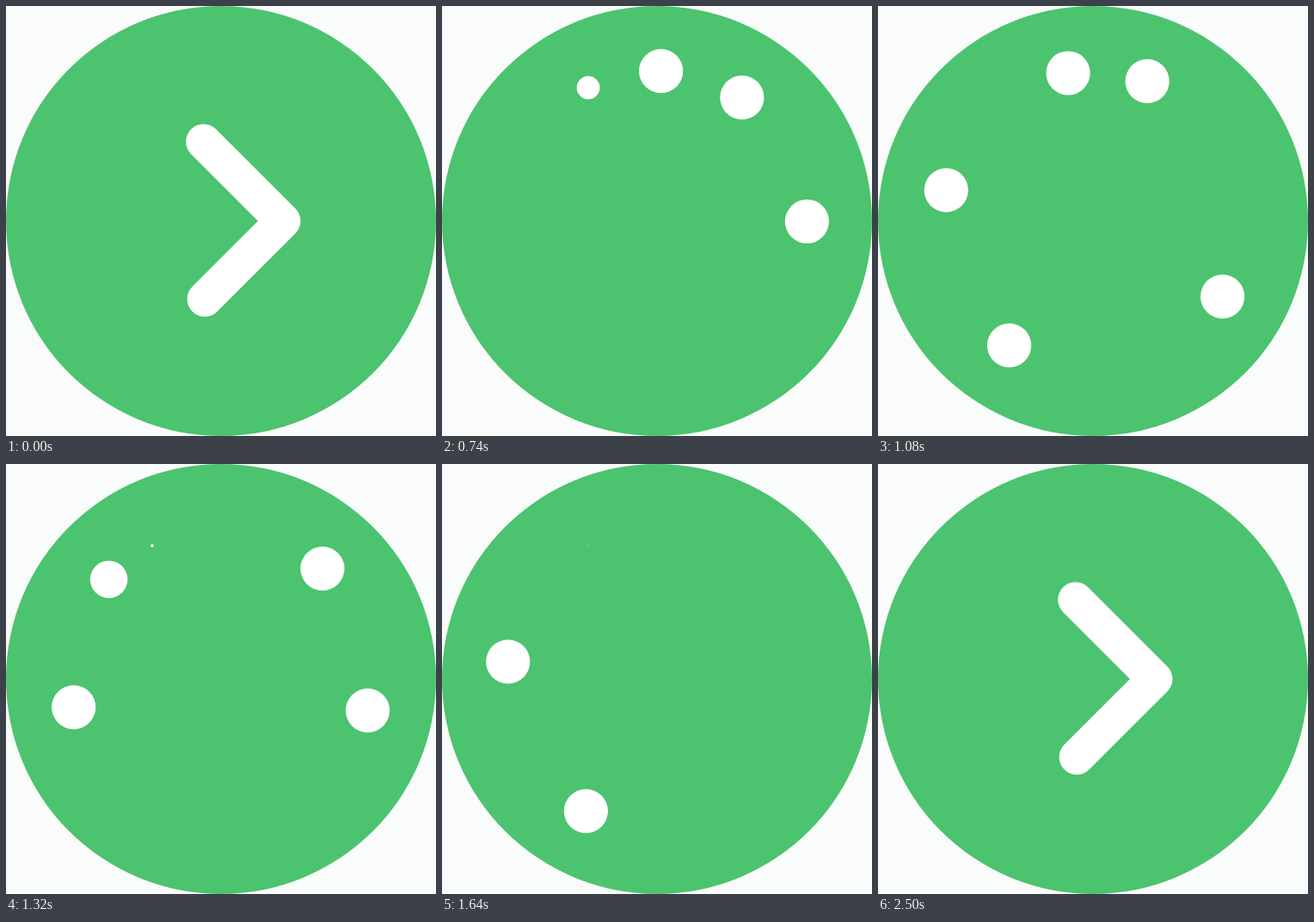
An HTML page with a canvas that plays this animation: 500 by 500 pixels, repeating every 3020 ms.

```html
<!DOCTYPE html>
<html lang="en">
<head>
<meta charset="utf-8">
<title>Arrow loader</title>
<style>
  html, body { margin: 0; width: 100%; height: 100%; overflow: hidden; background: #fafbfb; }
  canvas { display: block; width: 500px; height: 500px; }
</style>
</head>
<body>
<canvas id="stage" width="500" height="500"></canvas>
<script>
const ctx = document.getElementById('stage').getContext('2d');

const LOOP = 3020;
const CENTER = 250;
const ORBIT = 174.4;
const DOT = 25.6;
const START_ANGLE = -27.3;
const DOT_DELAYS = [165, 315, 465, 740, 885];

// Degrees travelled by a dot, as [ms, degrees] stops.
const TRAVEL = [
  [-30, 0], [100, 5], [195, 17.6], [253, 28.6], [340, 48.3], [403, 61.6], [435, 69.5],
  [553, 117], [615, 147], [755, 235], [855, 286], [907, 306], [1005, 338.6], [1080, 360]
];

// Arrow positions are measured along its path, from the tip.
const TIP = { x: 322, y: 250 };
const PATH_END = 204;
const REST = { tail: -128.5, head: 130.5 };
const EXIT_TIME = 310;
const ENTER_AT = 2165;
const ENTER_TIME = 335;

const clamp = x => Math.min(1, Math.max(0, x));
const lerp = (a, b, p) => a + (b - a) * p;
const easeInOut = p => (1 - Math.cos(Math.PI * clamp(p))) / 2;

function slope(i) {
  if (i === 0 || i === TRAVEL.length - 1) return i ? 0.28 : 0;
  const [a, b] = [TRAVEL[i - 1], TRAVEL[i + 1]];
  return (b[1] - a[1]) / (b[0] - a[0]);
}

// Smooth Hermite curve through the stops.
function travelled(time) {
  if (time <= TRAVEL[0][0]) return 0;
  const i = TRAVEL.findIndex(stop => stop[0] > time);
  if (i < 0) return 360;
  const [t0, a0] = TRAVEL[i - 1];
  const [t1, a1] = TRAVEL[i];
  const span = t1 - t0;
  const p = (time - t0) / span;
  const q = 1 - p;
  return a0 * q * q * (1 + 2 * p) + a1 * p * p * (3 - 2 * p)
    + span * p * q * (slope(i - 1) * q - slope(i) * p);
}

function disc(x, y, radius, color) {
  ctx.fillStyle = color;
  ctx.beginPath();
  ctx.arc(x, y, radius, 0, Math.PI * 2);
  ctx.fill();
}

function drawDot(time) {
  const size = easeInOut((time + 155) / 260) * (1 - easeInOut((time - 940) / 260));
  if (size < 0.005) return;
  const angle = (START_ANGLE + travelled(time)) * Math.PI / 180;
  disc(CENTER + ORBIT * Math.sin(angle), CENTER - ORBIT * Math.cos(angle), DOT * size, '#fff');
}

function pathPoint(s) {
  return [TIP.x - Math.abs(s) * Math.SQRT1_2, TIP.y - s * Math.SQRT1_2];
}

function drawArrow(tail, head) {
  if (head - tail < 0.1) return;
  ctx.strokeStyle = '#fff';
  ctx.lineWidth = 41;
  ctx.lineCap = ctx.lineJoin = 'round';
  ctx.beginPath();
  ctx.moveTo(...pathPoint(tail));
  if (tail < 0 && head > 0) ctx.lineTo(TIP.x, TIP.y);
  ctx.lineTo(...pathPoint(head));
  ctx.stroke();
}

function render(t) {
  ctx.fillStyle = '#fafbfb';
  ctx.fillRect(0, 0, 500, 500);
  disc(CENTER, CENTER, 250, '#4cc36f');

  if (t < EXIT_TIME) {
    const p = easeInOut(t / EXIT_TIME);
    drawArrow(lerp(REST.tail, PATH_END, p), lerp(REST.head, PATH_END, p));
  } else if (t > ENTER_AT) {
    const p = easeInOut((t - ENTER_AT) / ENTER_TIME);
    drawArrow(lerp(-PATH_END, REST.tail, p), lerp(-PATH_END, REST.head, p));
  }

  // The ring starts slightly late and catches up.
  const ringTime = t - 22 * clamp((1080 - t) / 340);
  DOT_DELAYS.forEach(delay => drawDot(ringTime - delay));
}

const begin = performance.now();
function tick() {
  render((performance.now() - begin) % LOOP);
  requestAnimationFrame(tick);
}
tick();
</script>
</body>
</html>
```
